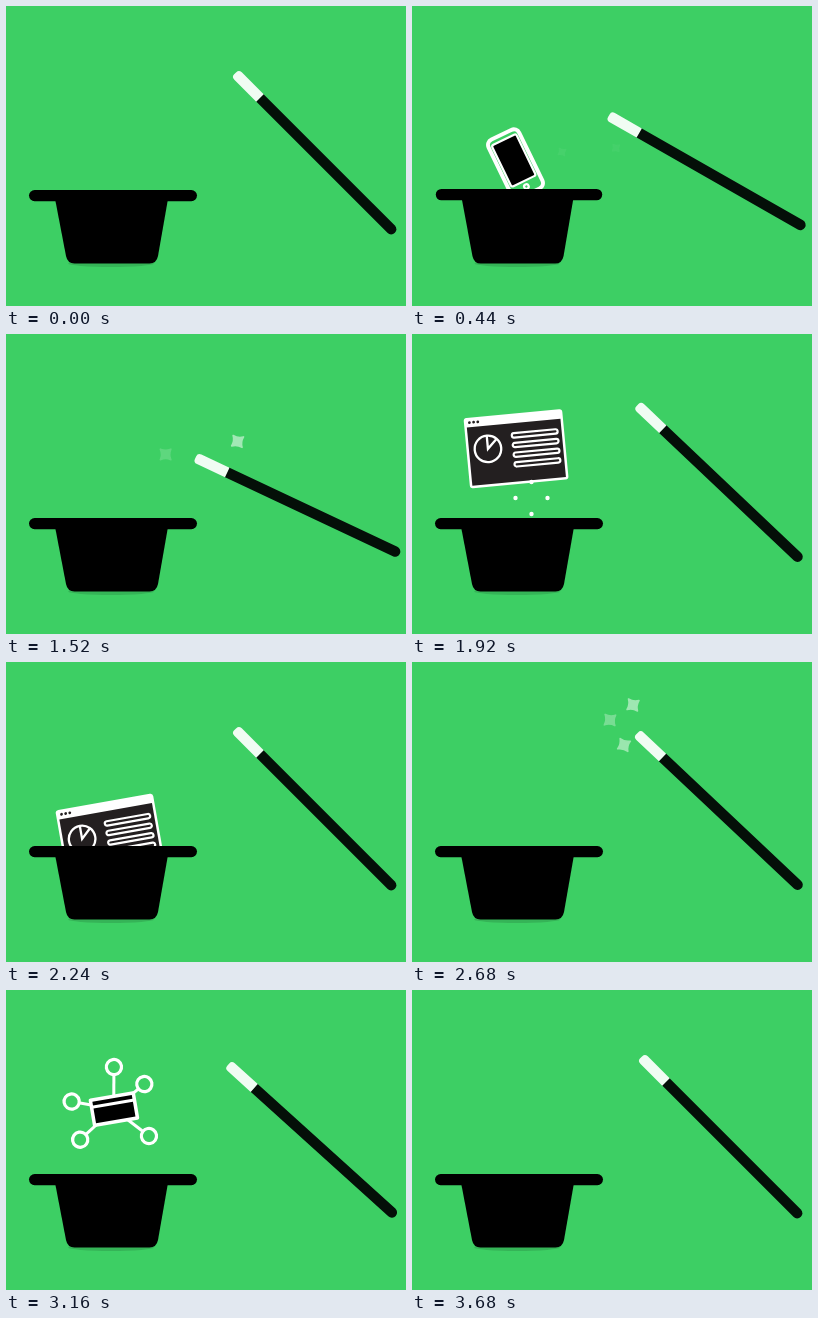
Write an HTML page that moves like this. It is 400x300 px and loops after 3.84 s.

```html
<!DOCTYPE html>
<html lang="en">
<head>
<meta charset="utf-8">
<title>Magic hat</title>
<style>
  html, body { margin: 0; width: 100%; height: 100%; overflow: hidden; background: #3dcf64; }
  svg { display: block; width: 100vw; height: 100vh; }
  .line { fill: none; stroke: #fff; }
</style>
</head>
<body>
<svg viewBox="0 0 400 300">
  <defs>
    <clipPath id="above"><rect width="400" height="189"/></clipPath>
  </defs>

  <g clip-path="url(#above)">
    <g class="item">
      <rect class="line" x="-17" y="-32.5" width="34" height="65" rx="6" stroke-width="4"/>
      <rect class="line" x="-13.5" y="-27" width="27" height="46" rx="2" stroke-width="2.2" style="fill:#000"/>
      <circle cy="25" r="3.4" fill="#fff"/>
      <circle cy="25" r="1.2" fill="#3dcf64"/>
    </g>

    <g class="item">
      <rect x="-49.5" y="-34.5" width="99" height="70.5" rx="3" fill="#fff"/>
      <rect x="-47" y="-25" width="94" height="58.5" fill="#231f20"/>
      <g fill="#231f20">
        <circle cx="-44" cy="-29.7" r="1.4"/>
        <circle cx="-39.8" cy="-29.7" r="1.4"/>
        <circle cx="-35.6" cy="-29.7" r="1.4"/>
      </g>
      <circle class="line" cx="-28" cy="-1.8" r="13.3" stroke-width="2.3"/>
      <path class="line" d="M-28-15V-1.8L-18.4-11" stroke-width="2.3"/>
      <g id="bars"></g>
    </g>

    <g class="item">
      <g id="nodes"></g>
      <rect x="-23.3" y="-14.3" width="47" height="29" rx="2" fill="#fff"/>
      <path d="M-19.8-10.8h40v3.8h-40zM-19.8-4h40v15h-40z"/>
    </g>
    <g id="burst" fill="#fff"></g>
  </g>

  <g id="hat">
    <ellipse cx="105" cy="257.5" rx="43" ry="3.4" fill="#000" opacity=".13"/>
    <path d="M48.500 190H162.500L152 250Q150.500 257.500 143.500 257.500H68.500Q61.500 257.500 60 250Z"/>
    <rect x="23" y="184" width="168" height="11.200" rx="5.600"/>
  </g>

  <g id="wand">
    <path d="M-166-5.250H20A5.250 5.250 0 0 1 20 5.250H-166Z" fill="#040f08"/>
    <path d="M-165.500-5.250H-196.500Q-200.500-5.250-200.500-1.500V1.500Q-200.500 5.250-196.500 5.250H-165.500Z" fill="#f0fcf3"/>
  </g>

  <g id="stars" fill="#fff" stroke="#fff" stroke-width="1.500" stroke-linejoin="round"></g>
</svg>
<script>
const CYCLE = 1280, STEP = 40;
const HIT = 296, APEX = 690, LAND = 1080;

const $ = id => document.getElementById(id);
function add(parent, tag, attrs) {
  const el = document.createElementNS('http://www.w3.org/2000/svg', tag);
  for (const key in attrs) el.setAttribute(key, attrs[key]);
  return parent.appendChild(el);
}
const place = (el, value) => el.setAttribute('transform', value);

// Linear interpolation through [time, value] pairs
function track(keys, t) {
  if (t <= keys[0][0]) return keys[0][1];
  for (let i = 1; i < keys.length; i++) {
    const [t0, a] = keys[i - 1], [t1, b] = keys[i];
    if (t <= t1) return a + (b - a) * (t - t0) / (t1 - t0);
  }
  return keys[keys.length - 1][1];
}

for (let i = 0; i < 4; i++) {
  add($('bars'), 'rect', { class: 'line', x: -3, y: -15 + i * 9.7, width: 46, height: 4.4, rx: 2.2, 'stroke-width': 2.2 });
}

const nodes = [[7.3, -41.3], [34.4, -19.4], [30.2, 32.6], [-38.2, 24.6], [-40.2, -14.4]];
for (const [x, y] of nodes) {
  add($('nodes'), 'path', { class: 'line', d: `M0 0L${x} ${y}`, 'stroke-width': 3 });
}
for (const [cx, cy] of nodes) {
  add($('nodes'), 'circle', { cx, cy, r: 7.6, fill: '#3dcf64', stroke: '#fff', 'stroke-width': 3.2 });
}

const dots = [0, 1, 2, 3].map(() => add($('burst'), 'circle', {}));

// x, y, turn, peak time, peak opacity
const stars = [
  [221, 43, 8, 120, .5], [198, 58, 4, 120, .3], [212, 83, 14, 120, .48],
  [231.6, 107.4, 8, 240, .52], [159.6, 120.4, 0, 240, .17],
  [150, 146, 10, 360, .4], [204, 142, 4, 360, .3]
].map(([x, y, turn, peak, alpha]) => ({
  x, y, turn, peak, alpha,
  el: add($('stars'), 'path', { d: 'M-5.3-5.3Q0-3 5.3-5.3Q3 0 5.3 5.3Q0 3-5.3 5.3Q-3 0-5.3-5.3Z' })
}));

const items = [...document.querySelectorAll('.item')];
const homes = [[103.5, 104.9], [104, 111.9], [107.7, 112.1]];
const tilt = [[HIT, -40], [560, -14], [640, -5.4], [720, -1], [840, -4], [LAND, -16]];
const squash = [[280, 0], [340, .03], [420, -.012], [520, 0], [1000, 0], [1060, .022], [1120, 0]];

// Accelerates into the tap, then eases back to rest
function swing(t) {
  const begin = 70, back = 321, rest = 815;
  if (t < begin || t > rest) return 0;
  if (t < HIT) return 35 * ((t - begin) / (HIT - begin)) ** 2;
  return 35 * Math.min(1, ((rest - t) / (rest - back)) ** 3);
}

function draw(time) {
  const step = Math.floor(time / STEP) * STEP;
  const t = step % CYCLE;
  const current = Math.floor(step / CYCLE) % items.length;

  place($('wand'), `translate(371 209) rotate(${45 - swing(t)})`);

  const s = track(squash, t);
  place($('hat'), `translate(107 258) scale(${1 + s} ${1 - 1.5 * s}) translate(-107 -258)`);

  items.forEach((el, i) => {
    const shown = i === current && t > HIT && t < LAND;
    el.style.display = shown ? '' : 'none';
    const [x, y] = homes[i];
    place(el, `translate(${x} ${y + .00085 * (t - APEX) ** 2}) rotate(${track(tilt, t)})`);
  });

  const spread = track([[600, 8], [640, 16], [760, 24]], t);
  const size = track([[600, 0], [640, 2.2], [760, 0]], t);
  dots.forEach((dot, i) => {
    const a = i * Math.PI / 2;
    dot.setAttribute('cx', 119.5 + spread * Math.cos(a));
    dot.setAttribute('cy', 164 + spread * Math.sin(a));
    dot.setAttribute('r', size);
  });

  for (const star of stars) {
    const glow = Math.max(0, 1 - Math.abs(t - star.peak) / 90);
    star.el.setAttribute('opacity', star.alpha * glow);
    place(star.el, `translate(${star.x} ${star.y}) rotate(${star.turn}) scale(${.6 + .4 * glow})`);
  }
}

const start = performance.now();
function tick() {
  draw(performance.now() - start);
  requestAnimationFrame(tick);
}
tick();
</script>
</body>
</html>
```
